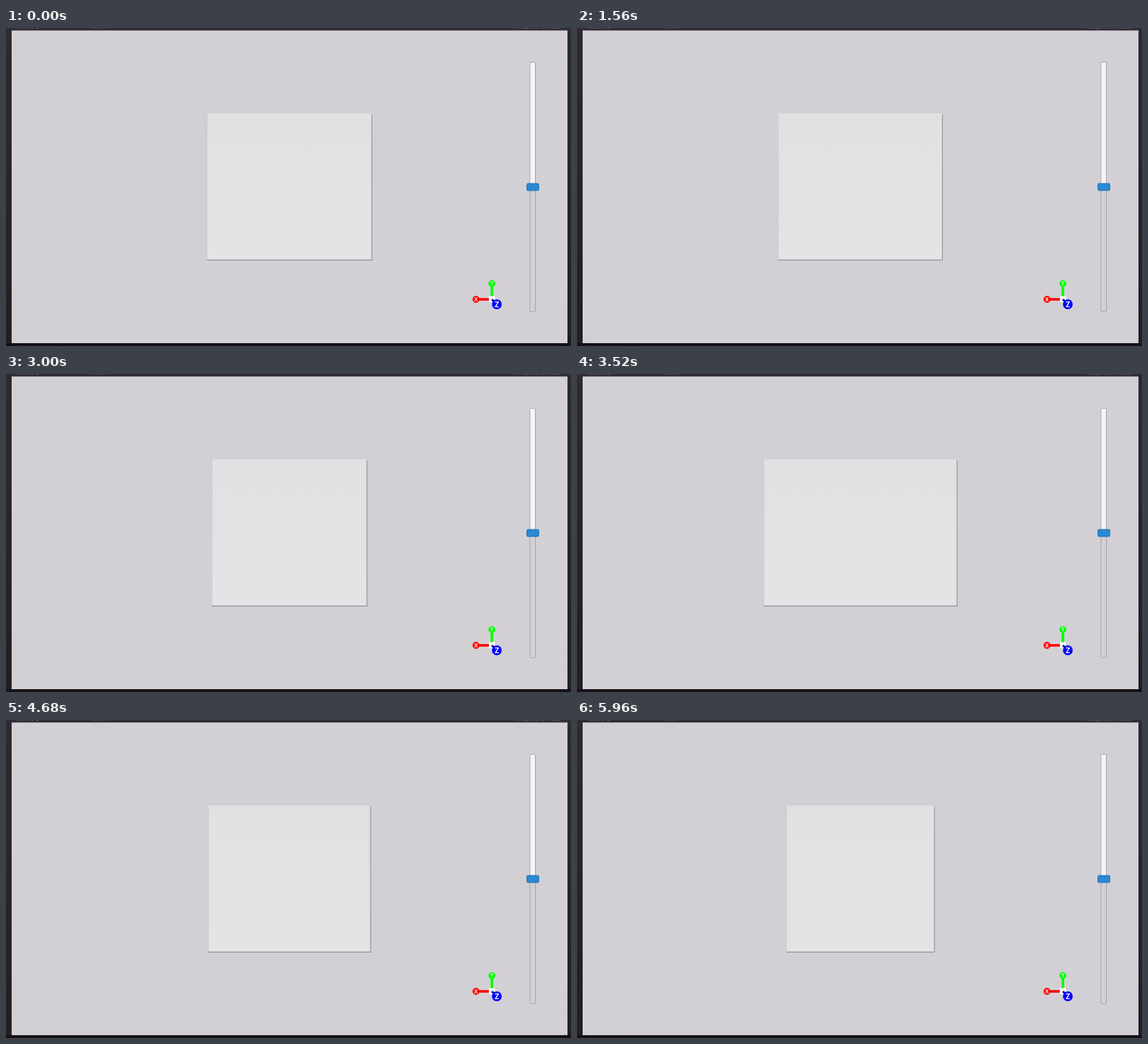
Animation of 800 by 450 pixels, one loop 6 s. Source, as an HTML page:

```html
<!DOCTYPE html>
<html lang="en">
<head>
<meta charset="utf-8">
<style>
  html, body { margin: 0; width: 100%; height: 100%; overflow: hidden; background: #d2d0d4; }
  svg { display: block; width: 800px; height: 450px; }
  text { font-family: Inter, Arial, sans-serif; text-anchor: middle; fill: #fff; }
  .hint { font-size: 8px; text-anchor: start; fill: #8d8892; }
</style>
</head>
<body>
<svg viewBox="0 0 800 450">
  <defs>
    <linearGradient id="face" x2="0" y2="1">
      <stop stop-color="#e1e0e2"/><stop offset="1" stop-color="#e4e3e5"/>
    </linearGradient>
    <linearGradient id="side" x2="0" y2="1">
      <stop stop-color="#2e2a31"/><stop offset="1" stop-color="#211e24"/>
    </linearGradient>
  </defs>

  <!-- window frame -->
  <rect width="800" height="450" fill="url(#side)"/>
  <rect width="800" height="3.5" fill="#302b34"/>
  <rect y="446" width="800" height="4" fill="#141216"/>
  <g opacity=".7">
    <text class="hint" x="16" y="1">Scene 2</text>
    <text class="hint" x="123" y="1">View</text>
    <text class="hint" x="718" y="1">Perspective mode</text>
    <text class="hint" x="17" y="455" style="fill:#7a2027">Cross section view</text>
  </g>
  <rect x="8" y="3.5" width="787" height="442.5" fill="#d2d0d4"/>

  <!-- block -->
  <rect id="shade" y="122" height="207" fill="#8e8d90"/>
  <rect id="block" y="121" height="206.8" fill="url(#face)"/>

  <!-- slider -->
  <rect x="742" y="48.5" width="7.5" height="353" rx="1.5" fill="#d3d1d3" stroke="#a6a4a7"/>
  <rect x="742.5" y="49" width="6.5" height="172" rx="1" fill="#f5f4f6"/>
  <rect x="737.5" y="220" width="17" height="10" rx="1.5" fill="#2b88d3" stroke="#2474b8"/>

  <!-- axes -->
  <path d="M668 384H685" stroke="#f00" stroke-width="3.6"/>
  <path d="M688 364V380" stroke="#0f0" stroke-width="3.6"/>
  <rect x="683.8" y="379.5" width="8.4" height="8.6" fill="#fff"/>
  <path d="M688 384L695 391" stroke="#0000b0" stroke-width="3"/>
  <circle cx="665.5" cy="384" r="4.9" fill="#f00"/>
  <circle cx="688" cy="361.6" r="4.9" fill="#0f0"/>
  <circle cx="695" cy="391" r="6.9" fill="#00f"/>
  <text x="665.5" y="386.7" font-size="7.5" font-weight="600">X</text>
  <text x="688" y="364.2" font-size="7" font-weight="600">Y</text>
  <text x="695" y="394.7" font-size="10" font-weight="700">Z</text>
</svg>
<script>
  const LOOP = 6000, STEP = 40, CENTER = 401.2, HALF = 103.5;
  const block = document.getElementById('block');
  const shade = document.getElementById('shade');
  const start = performance.now();

  function span(el, left, right) {
    el.setAttribute('x', left);
    el.setAttribute('width', right - left);
  }

  // Width of a slice through a cube turning at one radian per second.
  function draw(now) {
    const time = Math.floor(Math.max(0, now - start) % LOOP / STEP) * STEP;
    const angle = time / 1000 + 0.48;
    const half = HALF / Math.max(Math.abs(Math.cos(angle)), Math.abs(Math.sin(angle)));
    span(block, CENTER - half, CENTER + half - 0.4);
    span(shade, CENTER - half, CENTER + half + 0.7);
    requestAnimationFrame(draw);
  }
  draw(start);
</script>
</body>
</html>
```
